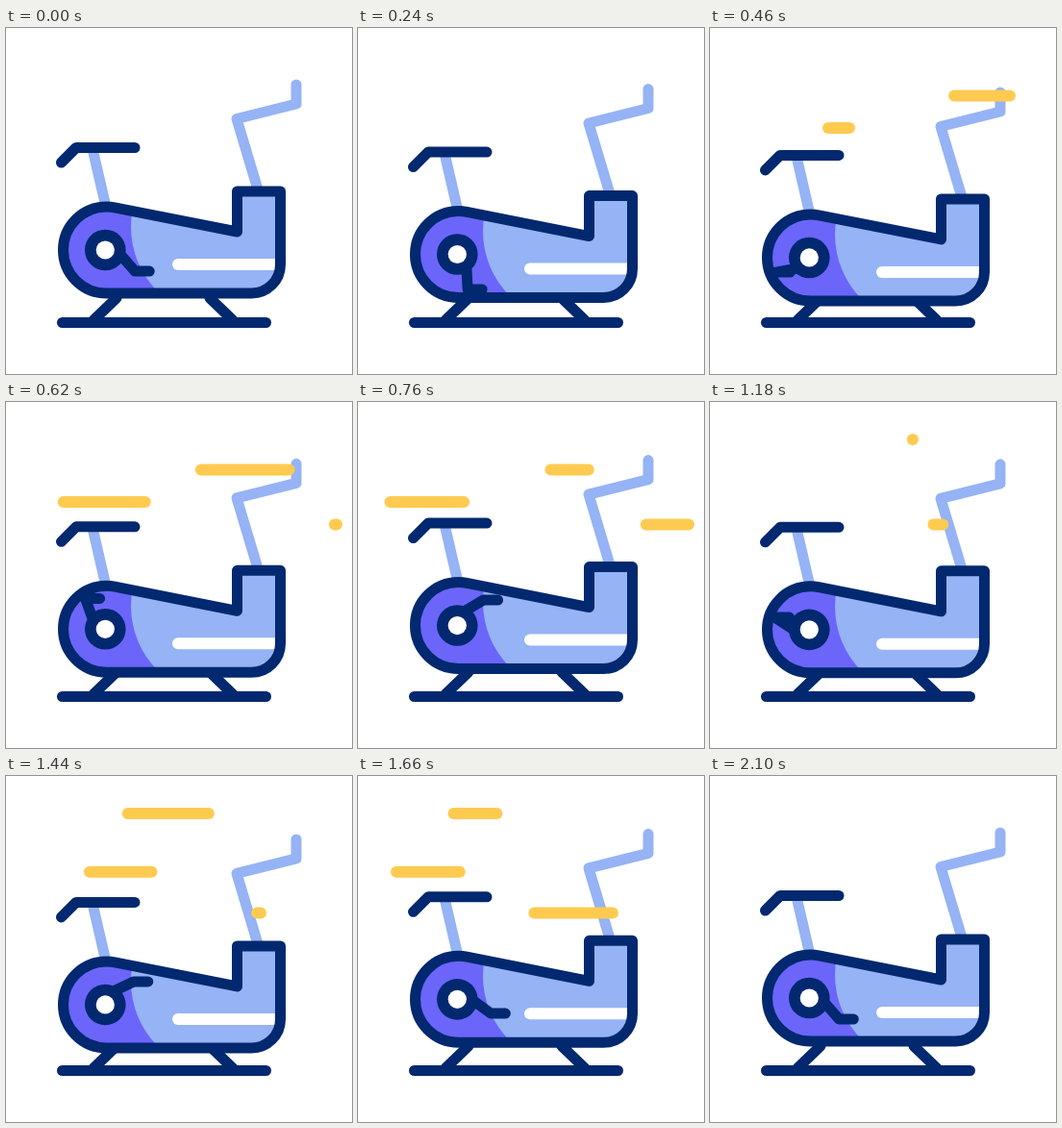
Write an HTML page with a canvas that moves like this. It is 360 by 360 pixels and loops after 2400 ms.

```html
<!DOCTYPE html>
<html lang="en">
<head>
<meta charset="utf-8">
<title>Exercise bike</title>
<style>
  html, body { margin: 0; width: 100%; height: 100%; overflow: hidden; background: #fff; }
  canvas { display: block; width: 360px; height: 360px; }
</style>
</head>
<body>
<canvas id="stage"></canvas>
<script>
const SIZE = 360, LOOP = 2400;
const NAVY = '#02286f', LIGHT = '#95b3f5', PURPLE = '#6b65fa', YELLOW = '#ffca50', WHITE = '#fff';
const canvas = document.getElementById('stage');
const ctx = canvas.getContext('2d');
const ratio = window.devicePixelRatio || 1;
canvas.width = canvas.height = SIZE * ratio;

// Speed lines: start time, right end, height
const STREAKS = [
  [256, 312, 70.5], [347, 145, 104], [589, 344, 127.5],
  [1170, 211, 39], [1220, 151.5, 99.7], [1397, 265, 142.5]
];
const STREAK_LENGTH = 111.5, STREAK_TIME = 400, TAIL_DELAY = 265;

const clamp = x => Math.min(1, Math.max(0, x));
const ease = x => { const s = clamp(x); return s * s * (3 - 2 * s); };

function line(color, width, ...pts) {
  ctx.strokeStyle = color;
  ctx.lineWidth = width;
  ctx.beginPath();
  pts.forEach(([x, y]) => ctx.lineTo(x, y));
  ctx.stroke();
}

function disc(color, x, y, r) {
  ctx.fillStyle = color;
  ctx.beginPath();
  ctx.arc(x, y, r, 0, Math.PI * 2);
  ctx.fill();
}

function bodyPath() {
  const p = new Path2D();
  p.moveTo(240.5, 212);
  p.lineTo(240.5, 170);
  p.lineTo(285.5, 170);
  p.lineTo(285.5, 246);
  p.arcTo(285.5, 276, 255.5, 276, 30);
  p.lineTo(104.5, 276);
  p.arc(104.5, 231, 45, Math.PI / 2, Math.PI * 1.562);
  p.closePath();
  return p;
}
const body = bodyPath();

function drawBody() {
  ctx.save();
  ctx.clip(body);
  ctx.fillStyle = PURPLE;
  ctx.fillRect(50, 160, 250, 130);
  disc(LIGHT, 225, 207, 95);
  ctx.fillRect(165, 160, 130, 130);
  line(WHITE, 12, [179, 246], [290, 246]);
  ctx.restore();
  ctx.strokeStyle = NAVY;
  ctx.lineWidth = 11;
  ctx.stroke(body);
}

function drawCrank(angle) {
  const c = Math.cos(angle), s = Math.sin(angle);
  const spin = (x, y) => [103.3 + x * c - y * s, 231 + x * s + y * c];
  const tip = spin(31, 22);
  line(NAVY, 11, spin(12.6, 1), tip, [tip[0] + 15, tip[1]]);
  disc(NAVY, 103.3, 231, 21.3);
  disc(WHITE, 103.3, 231, 9.6);
}

function drawStreak(t, [start, x, y]) {
  const age = t - start;
  if (age < 0 || age >= TAIL_DELAY + STREAK_TIME) return;
  const head = x - STREAK_LENGTH * ease(age / STREAK_TIME);
  const tail = x - STREAK_LENGTH * ease((age - TAIL_DELAY) / STREAK_TIME);
  line(YELLOW, 12, [head - 0.01, y], [tail, y]);
}

function draw(t) {
  ctx.setTransform(ratio, 0, 0, ratio, 0, 0);
  ctx.fillStyle = WHITE;
  ctx.fillRect(0, 0, SIZE, SIZE);
  ctx.lineCap = ctx.lineJoin = 'round';

  line(NAVY, 11, [115, 281], [91, 304]);
  line(NAVY, 11, [212, 281], [236, 304]);
  line(NAVY, 11, [58.5, 306.5], [270.5, 306.5]);

  const bob = 4 * (1 - Math.cos(Math.PI * 4 * clamp(t / 1780)));
  ctx.save();
  ctx.translate(0, bob);
  line(LIGHT, 11, [91, 130], [103.5, 184]);
  line(NAVY, 11, [57.5, 140], [73, 124.5], [134, 124.5]);
  line(LIGHT, 11, [262, 168], [240, 94.5], [302, 79], [302, 59]);
  drawBody();
  drawCrank(Math.PI * 4 * ease((t + 12) / 1815));
  ctx.restore();

  STREAKS.forEach(s => drawStreak(t, s));
}

const begin = performance.now();
function tick() {
  draw((performance.now() - begin) % LOOP);
  requestAnimationFrame(tick);
}
tick();
</script>
</body>
</html>
```
